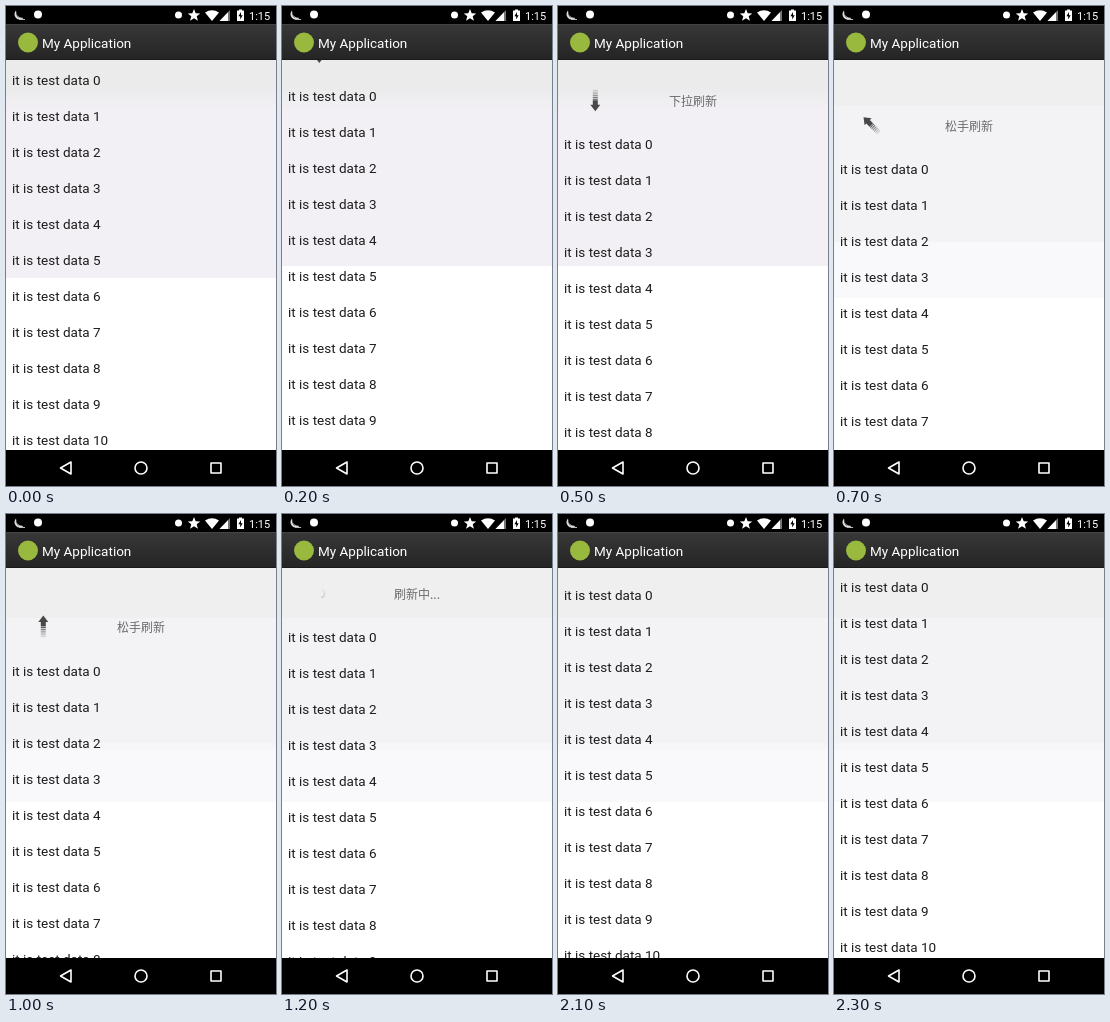
Write an HTML page with a canvas that moves like this. It is 270 px wide and 480 px high and loops after 2400 ms.

```html
<!DOCTYPE html>
<html lang="zh-CN">
<meta charset="utf-8">
<title>Pull to refresh</title>
<style>
  html, body { margin: 0; width: 100%; height: 100%; overflow: hidden; background: #000; }
  canvas { display: block; }
</style>
<canvas width="270" height="480"></canvas>
<script>
const c = document.querySelector('canvas').getContext('2d');
const LOOP = 2400, STEP = 100, ROW = 36;

// Height of the first row over time: [ms, y, decelerate into this key]
const keys = [
  [0, 74], [100, 79], [300, 101], [600, 157], [700, 163], [900, 162.5],
  [1000, 156.5], [1200, 123, true], [1800, 123], [2300, 73, true], [2400, 73]
];

function rowY(t) {
  const i = keys.findIndex((k, n) => n && t <= k[0]);
  const [t0, y0] = keys[i - 1], [t1, y1, slow] = keys[i];
  let p = (t - t0) / (t1 - t0);
  if (slow) p = 1 - (1 - p) ** 2;
  return y0 + (y1 - y0) * p;
}

function box(color, x, y, w, h) {
  c.fillStyle = color;
  c.fillRect(x, y, w, h);
}

function fill(color, path) {
  c.fillStyle = color;
  c.fill(new Path2D(path));
}

function disc(color, x, y, r) {
  c.fillStyle = color;
  c.beginPath();
  c.arc(x, y, r, 0, 7);
  c.fill();
}

function text(s, x, y, size, color, font = 'Roboto', align = 'left') {
  c.font = `${size}px ${font}, sans-serif`;
  c.textAlign = align;
  c.fillStyle = color;
  c.fillText(s, x, y);
}

function shade(y0, y1, from, to) {
  const g = c.createLinearGradient(0, y0, 0, y1);
  g.addColorStop(0, from);
  g.addColorStop(1, to);
  return g;
}

function backdrop(t) {
  box('#fff', 0, 54, 270, 390);
  if (t < 600) {
    box('#f2f0f4', 0, 54, 270, t < 200 ? 218 : 206);
    box('#ebebec', 0, 54, 270, 32);
    box(shade(82, 104, '#ebebec', '#f2f0f4'), 0, 82, 270, 22);
  } else {
    const late = t >= 1000;
    box('#f9f9fc', 0, 54, 270, late ? 234 : 238);
    box('#f3f2f5', 0, 54, 270, 182);
    if (late) box('#f6f6f9', 0, 229, 270, 7);
    box('#efeff0', 0, 54, 270, late ? 50 : 46);
  }
}

// Points down at angle 0
function arrow(y, angle) {
  c.save();
  c.translate(37.3, y);
  c.rotate(angle * Math.PI / 180);
  fill('#484848', 'M0 11L-5 4.5H-2.5V0H2.5V4.5H5Z');
  for (let i = 0; i < 6; i++) {
    c.globalAlpha = 0.85 - i * 0.13;
    box('#484848', -2.5, -1.6 - i * 1.8, 5, 1.1);
  }
  c.restore();
}

function spinner(y, t) {
  const a = (t - 1200) / 600 * Math.PI * 2.5 - 1.2;
  c.lineWidth = 1.3;
  for (let i = 0; i < 8; i++) {
    c.strokeStyle = `rgba(150,150,155,${0.08 + i * 0.06})`;
    c.beginPath();
    c.arc(38, y, 4.5, a + i * 0.3, a + i * 0.3 + 0.3);
    c.stroke();
  }
}

function list(t) {
  const y = rowY(t);
  c.save();
  c.beginPath();
  c.rect(0, 54, 270, 390);
  c.clip();
  backdrop(t);
  const label = t < 600 ? '下拉刷新' : t < 1100 ? '松手刷新' : '刷新中...';
  text(label, 135, y - 38.5, 12, '#6b6b6d', '"Noto Sans CJK SC", "Noto Sans CJK"', 'center');
  if (t < 1100) arrow(y - 44, Math.max(0, Math.min(180, (t - 550) * 0.9)));
  else spinner(y - 43.5, t);
  for (let i = 0; i <= 10; i++) text('it is test data ' + i, 6, y + 5 + i * ROW, 13.5, '#1c1c1c');
  c.restore();
}

function statusBar() {
  box('#000', 0, 0, 270, 18);
  fill('#ddd', 'M10 4.5A4.5 4.5 0 1 0 17.5 12Q10 12 10 4.5Z');
  fill('#000', 'M10.8 7A3.5 3.5 0 0 0 14 11.8Q10.8 11 10.8 7Z');
  box('#bbb', 13, 13, 6, 1);
  disc('#fff', 32, 8.5, 4);
  disc('#fff', 172.5, 9, 3.5);
  fill('#fff', 'M188 3L189.7 7.2 194.2 7.5 190.7 10.3 191.9 14.7 188 12.2 184.1 14.7 185.3 10.3 181.8 7.5 186.3 7.2Z');
  fill('#fff', 'M199 6.5Q206 1.8 213 6.5L206 15Z');
  fill('#777', 'M224 4V15H213.5Z');
  fill('#fff', 'M222 6.2V15H213.5Z');
  fill('#fff', 'M231 4.5H233V3.5H236V4.5H238V15H231Z');
  fill('#000', 'M235 6L232.4 10.3H234.2V13.5L236.7 9.2H235Z');
  text('1:15', 243, 13.5, 11, '#fff', 'Roboto');
}

function actionBar() {
  box(shade(18, 54, '#383838', '#242424'), 0, 18, 270, 36);
  box('#444', 0, 18, 270, 1);
  box('#1a1a1a', 0, 53, 270, 1);
  disc('#98b83e', 22, 36.5, 10);
  text('My Application', 36, 42, 13.5, '#fff');
}

function navBar() {
  box('#000', 0, 444, 270, 36);
  c.strokeStyle = '#fff';
  c.lineWidth = 1.6;
  c.lineJoin = 'round';
  c.stroke(new Path2D('M65 456V468L54.5 462Z'));
  c.stroke(new Path2D('M141 462A6 6 0 1 1 129 462A6 6 0 1 1 141 462Z'));
  c.stroke(new Path2D('M205 457H215V467H205Z'));
}

const start = performance.now();

function draw() {
  const t = Math.floor((performance.now() - start) % LOOP / STEP) * STEP;
  list(t);
  statusBar();
  actionBar();
  navBar();
  requestAnimationFrame(draw);
}

draw();
</script>
</html>
```
